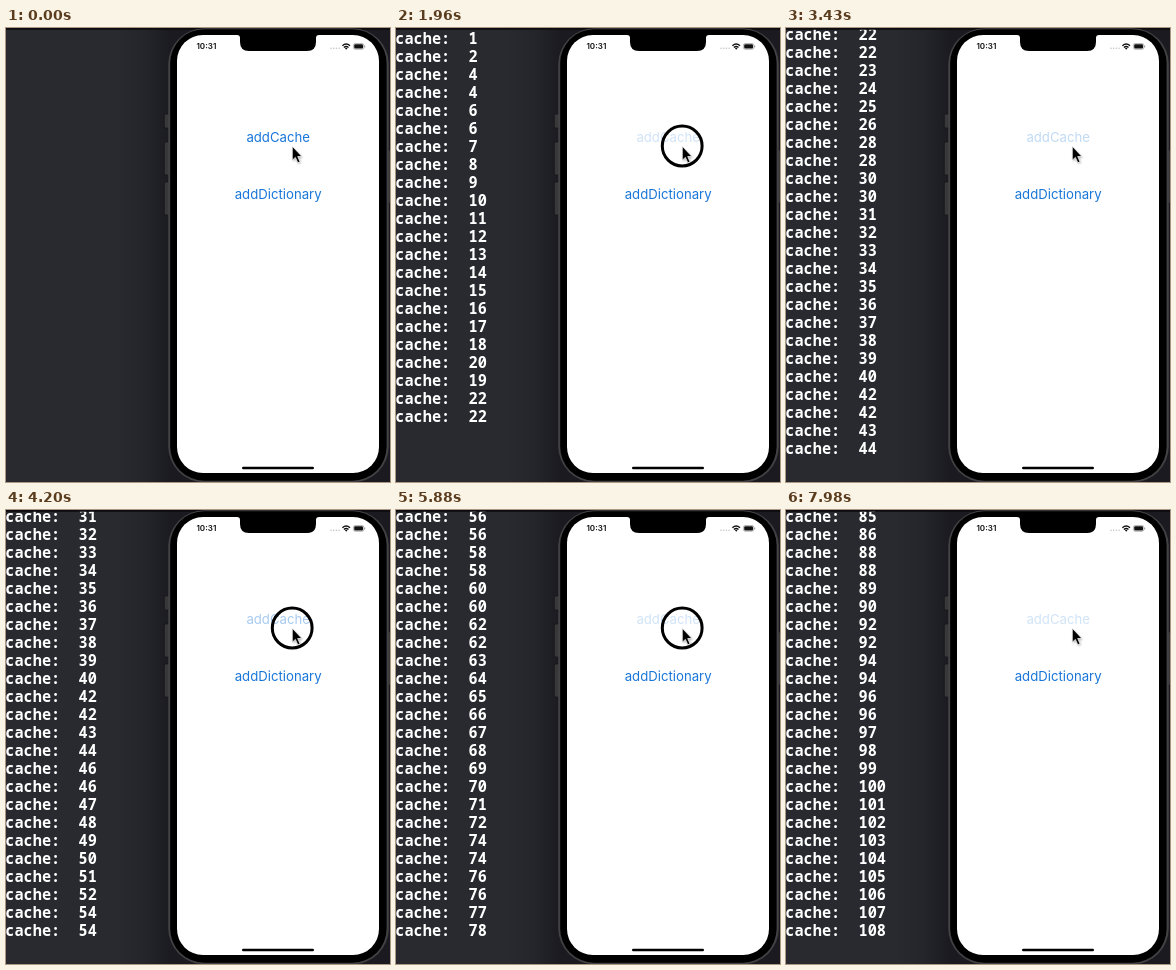
An HTML page that plays this animation: 384 by 454 pixels, repeating every 8 s.

```html
<!DOCTYPE html>
<html lang="en">
<head>
<meta charset="utf-8">
<title>Cache log</title>
<style>
  html, body { margin: 0; width: 100%; height: 100%; overflow: hidden; background: #292a2f; }
  svg { display: block; width: 384px; height: 454px; }
  #log text { font: bold 15.25px "Noto Sans Mono", "DejaVu Sans Mono", monospace; white-space: pre; fill: #fff; }
  .button { font: 400 13.2px Inter, Roboto, sans-serif; fill: #1976d8; text-anchor: middle; }
  .clock { font: 600 8.1px Inter, Roboto, sans-serif; fill: #111; }
</style>
</head>
<body>
<svg viewBox="0 0 384 454" xmlns="http://www.w3.org/2000/svg">
  <defs>
    <linearGradient id="shade" x1="0" x2="1">
      <stop offset="0" stop-color="#17171d" stop-opacity="0"/>
      <stop offset=".5" stop-color="#17171d" stop-opacity=".25"/>
      <stop offset="1" stop-color="#17171d" stop-opacity=".85"/>
    </linearGradient>
    <filter id="soft" x="-50%" y="-50%" width="200%" height="200%"><feGaussianBlur stdDeviation="1"/></filter>
  </defs>

  <rect width="384" height="454" fill="#292a2f"/>
  <rect x="110" width="56" height="454" fill="url(#shade)"/>
  <rect x="166" width="218" height="454" fill="#1a1a20"/>
  <g id="log"></g>
  <rect width="384" height="1.8" fill="#0c0c11"/>

  <g fill="#38383b" stroke="#111" stroke-width=".6">
    <rect x="158.3" y="86" width="6" height="14" rx="1.5"/>
    <rect x="158.3" y="114" width="6" height="33" rx="1.5"/>
    <rect x="158.3" y="154" width="6" height="33" rx="1.5"/>
    <rect x="380" y="122" width="5" height="53" rx="1.5"/>
  </g>
  <rect x="162.2" y=".2" width="220.6" height="454" rx="36" fill="#424245"/>
  <rect x="164.2" y="1.2" width="216.4" height="451.5" rx="34" fill="#000"/>
  <rect x="171" y="7" width="202" height="438" rx="26" fill="#fff"/>
  <path d="M231 6.5H313V7Q310 7 310 10V14Q310 23 301 23H243Q234 23 234 14V10Q234 7 231 7Z"/>
  <rect x="236" y="438.8" width="72" height="2.4" rx="1.2"/>

  <text class="clock" x="190.4" y="21.3">10:31</text>
  <g fill="#c4c4c6">
    <circle cx="325" cy="20.3" r=".8"/><circle cx="327.7" cy="20.3" r=".8"/>
    <circle cx="330.4" cy="20.3" r=".8"/><circle cx="333.1" cy="20.3" r=".8"/>
  </g>
  <g fill="none" stroke="#111" stroke-width="1.4">
    <path d="M336.4 17.8Q340.2 14.4 344 17.8"/>
    <path d="M337.9 19.5Q340.2 17.5 342.5 19.5"/>
  </g>
  <path d="M338.9 20.3Q340.2 19.2 341.5 20.3L340.2 21.7Z" fill="#111"/>
  <rect x="347.4" y="15.5" width="10.4" height="5.8" rx="1.8" fill="none" stroke="#888" stroke-width=".6"/>
  <rect x="348.2" y="16.2" width="8.8" height="4.4" rx="1.1" fill="#111"/>
  <rect x="358.3" y="17.4" width=".9" height="2" rx=".4" fill="#888"/>

  <text class="button" id="cacheButton" x="272.2" y="114.3">addCache</text>
  <text class="button" x="272.2" y="171.2">addDictionary</text>

  <circle id="ring" cx="286.2" cy="118" r="19.9" fill="none" stroke="#000" stroke-width="3"/>
  <path d="M287 120V133.500L290 131L292.500 136L295 135L293 130H297Z" fill="#000" opacity=".3" filter="url(#soft)"/>
  <path d="M286.300 118.300V132.200L289.400 129.400L291.800 134.800L294 133.800L291.700 128.500H295.900Z"
        fill="#000" stroke="#fff" stroke-width=".7" stroke-linejoin="round"/>
</svg>
<script>
const LOOP = 8000, STEP = 70, ROWS = 24, LINE_HEIGHT = 18;
const log = document.getElementById("log");
const ring = document.getElementById("ring");
const cacheButton = document.getElementById("cacheButton");

// Each tap logs two values; races make some pairs repeat the even one.
const repeated = new Set([4, 6, 22, 28, 30, 42, 46, 54, 56, 58, 60, 62, 74, 76, 88, 92, 94, 96]);
function logValue(n) {
  if (n === 19 || n === 20) return 39 - n;
  return repeated.has(n + 1) ? n + 1 : n;
}

// Taps land every second step, in runs [first, last].
const tapRuns = [[8, 30], [31, 67], [68, 80], [83, 97], [100, 100], [102, 114]];
function lineCount(step) {
  return tapRuns.reduce((sum, [first, last]) =>
    step < first ? sum : sum + 2 * (Math.floor((Math.min(step, last) - first) / 2) + 1), 0);
}

// The ring flips on every step except these.
const held = [13, 14, 26, 27, 28, 29, 31, 71, 81, 88, 92, 96, 97, 98, 99, 101];
function ringVisible(step) {
  if (step < 3) return false;
  const flips = step - 2 - held.filter(h => h <= step).length;
  return flips % 2 === 1;
}

function buttonOpacity(step, pressed) {
  if (step < 4) return 1;
  if (step < 30 || step > 70) return 0.2;
  return pressed ? 0.38 : 0.27;
}

const rows = Array.from({ length: ROWS }, () => {
  const row = document.createElementNS("http://www.w3.org/2000/svg", "text");
  row.setAttribute("x", -0.7);
  return log.appendChild(row);
});

function draw(time) {
  const step = Math.floor(time / STEP);
  const count = lineCount(step);
  const first = Math.max(0, count - ROWS);
  const top = count >= ROWS ? 12.3 : 16.3;
  rows.forEach((row, i) => {
    const n = first + i + 1;
    row.setAttribute("y", top + i * LINE_HEIGHT);
    row.textContent = n <= count ? `cache:  ${logValue(n)}` : "";
  });
  const pressed = ringVisible(step);
  ring.setAttribute("visibility", pressed ? "visible" : "hidden");
  cacheButton.setAttribute("opacity", buttonOpacity(step, pressed));
}

const start = performance.now();
function tick() {
  draw((performance.now() - start) % LOOP);
  requestAnimationFrame(tick);
}
tick();
</script>
</body>
</html>
```
